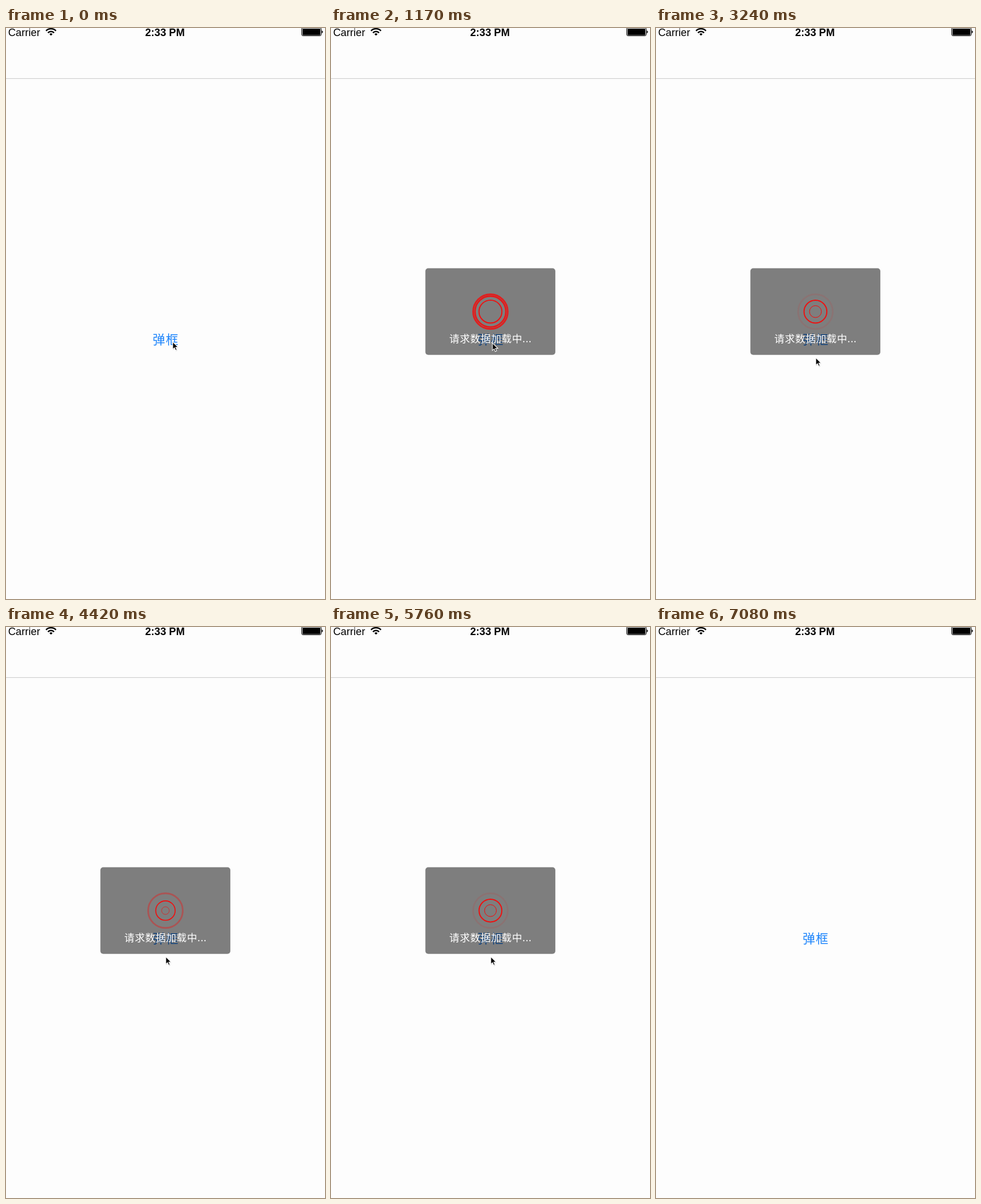
Recreate the animation shown at these times as an HTML page. Size 553 by 990 pixels, loop 7.36 s.

```html
<!DOCTYPE html>
<html lang="zh-CN">
<head>
<meta charset="utf-8">
<style>
  html, body { margin: 0; width: 100%; height: 100%; overflow: hidden; background: #fdfdfd; }
  svg { display: block; width: 553px; height: 990px; }
  .status { font: 18.2px "Liberation Sans", Arial, sans-serif; }
  .cjk { font-family: "Noto Sans CJK SC", "Noto Sans CJK", sans-serif; font-weight: 300; text-anchor: middle; }
</style>
</head>
<body>
<svg viewBox="0 0 553 990">
  <rect width="553" height="990" fill="#fdfdfd"/>
  <rect y="87" width="553" height="1.2" fill="#d0d0d0"/>

  <g class="status">
    <text x="3.7" y="13.6">Carrier</text>
    <text x="275.5" y="13.6" font-weight="700" text-anchor="middle">2:33 PM</text>
  </g>
  <g transform="translate(78 13.2)" fill="none" stroke="#000" stroke-width="2.5">
    <path d="M-8.6 -8.2A11.9 11.9 0 0 1 8.6 -8.2"/>
    <path d="M-5.3 -4.9A7.2 7.2 0 0 1 5.3 -4.9"/>
    <path d="M0 0L-2.7 -2.6A3.8 3.8 0 0 1 2.7 -2.6Z" fill="#000" stroke="none"/>
  </g>
  <rect x="512.5" y="-.5" width="34" height="14" rx="2.5" fill="none" stroke="#000"/>
  <rect x="514" y="1" width="31" height="11.5" rx="1.3"/>
  <path d="M547.5 4.2Q549.4 5 549.4 6.8T547.5 9.4Z"/>

  <text class="cjk" x="276.9" y="547.8" font-size="21.6" letter-spacing="1" fill="#1a83fb">弹框</text>

  <g id="popup">
    <rect x="163.6" y="416.6" width="225.3" height="150.2" rx="5" fill="#000" fill-opacity=".5"/>
    <g id="rings" fill="none" stroke="#f00"></g>
    <text class="cjk" x="276.5" y="545.2" font-size="17.6" letter-spacing=".5" fill="#fff">请求数据加载中...</text>
  </g>

  <g id="cursor">
    <g transform="scale(.9)">
      <path d="M.5 1.5V16L4 12.8 6.2 18 8.8 17 6.6 11.8H11Z" opacity=".2"/>
      <path d="M0 0V14.6L3.4 11.5 5.6 16.7 8.1 15.6 5.9 10.6H10.5Z" stroke="#fff" stroke-width="1.2"/>
    </g>
  </g>
</svg>

<script>
const LOOP = 7360, SHOW = 740, HIDE = 6060;
const STEP = 147, STEP_SHIFT = 7;
const RING_START = 310, PERIOD = 1250, GROW = 875, DELAY = 220;
const RADIUS = 30, STROKE = 2.9;

// Pointer rests and the glides between them.
const REST = [{ x: 289, y: 544 }, { x: 279.8, y: 546 }, { x: 277, y: 571.5 }, { x: 570, y: 1050 }];
const GLIDES = [[0, 290], [2350, 2650], [6200, 7040]];

const $ = id => document.getElementById(id);
const clamp = v => Math.min(1, Math.max(0, v));
const smooth = v => v * v * (3 - 2 * v);

const rings = [0, 1, 2].map(() => {
  const c = document.createElementNS("http://www.w3.org/2000/svg", "circle");
  c.setAttribute("cx", 276.4);
  c.setAttribute("cy", 491.7);
  return $("rings").appendChild(c);
});

// cubic-bezier(0, 0, .58, 1), solved by bisection
function easeOut(x) {
  let lo = 0, hi = 1;
  for (let i = 0; i < 20; i++) {
    const m = (lo + hi) / 2;
    if (1.74 * m * m * (1 - m) + m ** 3 < x) lo = m; else hi = m;
  }
  return smooth(lo);
}

// Each ring grows, holds its size while it fades, then starts over.
function drawRing(ring, age) {
  const p = Math.max(0, age) % PERIOD;
  const grow = clamp(p / GROW);
  const fade = clamp((p - GROW) / (PERIOD - GROW));
  const scale = easeOut(grow);
  ring.setAttribute("r", RADIUS * scale);
  ring.setAttribute("stroke-width", STROKE * scale);
  ring.setAttribute("opacity", (1 - .25 * grow) * (1 - fade * fade));
}

function drawCursor(t) {
  let { x, y } = REST[0];
  GLIDES.forEach(([from, to], i) => {
    const k = smooth(clamp((t - from) / (to - from)));
    x += (REST[i + 1].x - REST[i].x) * k;
    y += (REST[i + 1].y - REST[i].y) * k;
  });
  $("cursor").setAttribute("transform", `translate(${x} ${y})`);
}

function draw(t) {
  const tick = Math.max(0, Math.floor((t + STEP_SHIFT) / STEP) * STEP - STEP_SHIFT);
  $("popup").style.display = t >= SHOW && t < HIDE ? "" : "none";
  rings.forEach((ring, i) => drawRing(ring, tick - RING_START - i * DELAY));
  drawCursor(tick);
}

const start = performance.now();
function frame() {
  draw((performance.now() - start) % LOOP);
  requestAnimationFrame(frame);
}
frame();
</script>
</body>
</html>
```
